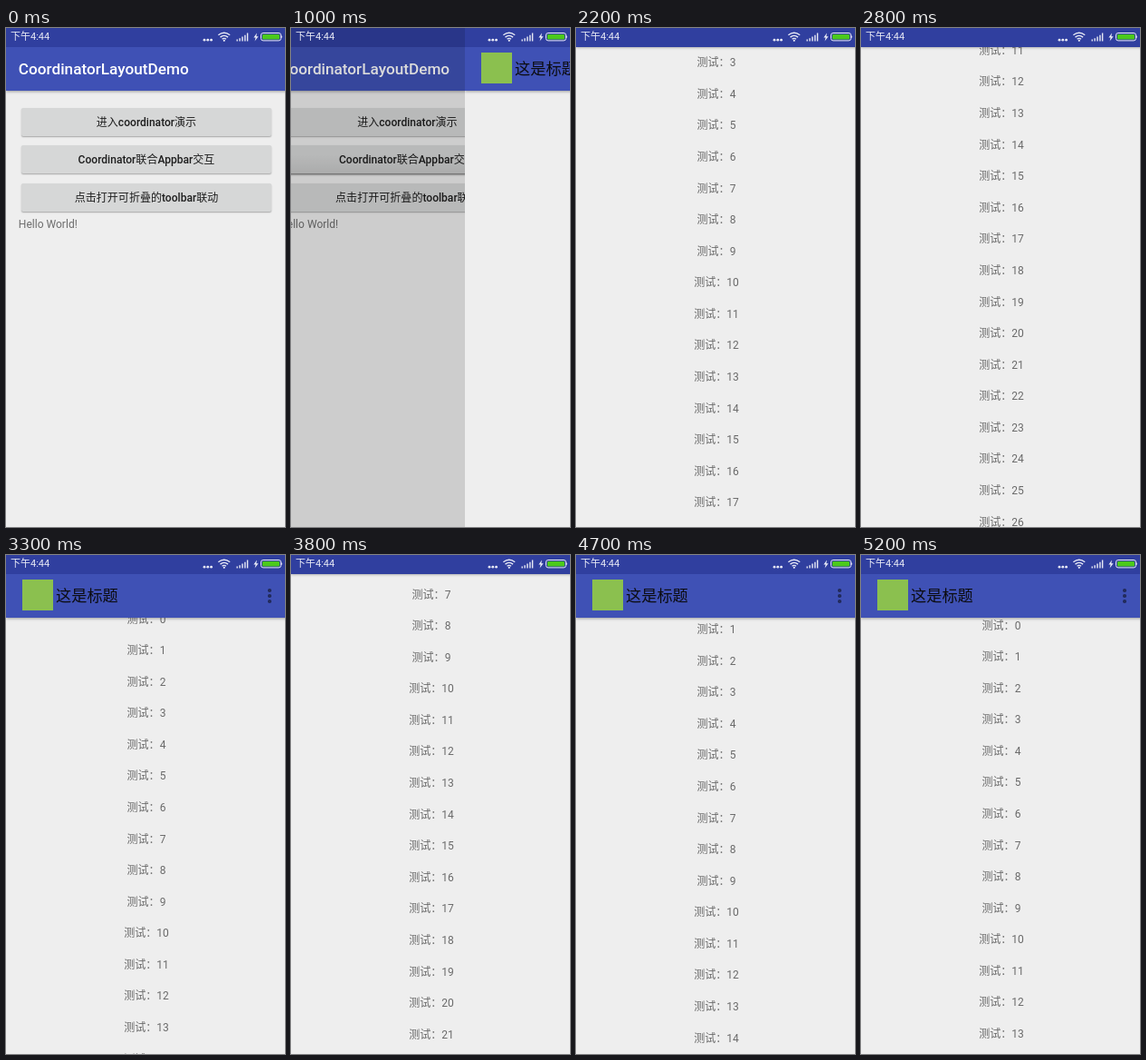
An HTML page that plays this animation: 308 px wide and 549 px high, repeating every 6 s.

```html
<!DOCTYPE html>
<html lang="zh-CN">
<head>
<meta charset="utf-8">
<title>Scrolling toolbar</title>
<style>
  html, body { margin: 0; width: 100%; height: 100%; overflow: hidden; }
  #stage {
    position: relative; width: 308px; height: 549px; overflow: hidden; background: #eee;
    font: 12.05px/20px Roboto, "Noto Sans CJK SC", "Noto Sans CJK", sans-serif; white-space: nowrap;
  }
  #stage div, #stage svg { position: absolute; }
  .page { left: 0; top: 0; width: 310px; height: 549px; overflow: hidden; background: #eee; }
  .status { left: 0; top: 0; width: 100%; height: 20.7px; background: #303f9f; }
  .bar {
    left: 0; top: 20.7px; width: 100%; height: 48.2px; background: #3f51b5;
    box-shadow: 0 1px 3px rgba(0, 0, 0, .35);
  }
  .title { top: 0; font-size: 17.2px; font-weight: 500; line-height: 49px; }
  .button {
    left: 17.2px; width: 275.6px; height: 31px; border-radius: 2px; background: #d6d7d7;
    box-shadow: 0 1px 1.5px rgba(0, 0, 0, .3);
    color: #1e1e1e; font-weight: 500; line-height: 32px; text-align: center;
  }
  .ripple {
    inset: 0; border-radius: 2px; opacity: 0;
    background: linear-gradient(transparent 33%, rgba(0, 0, 0, .07));
    box-shadow: 0 2px 2px rgba(0, 0, 0, .25);
  }
  .hello { left: 13.8px; top: 206px; color: #6d6d6d; }
  .dim { inset: 0; background: #000; opacity: 0; }
  .rows { left: 0; top: 0; width: 100%; }
  .row { width: 100%; text-align: center; color: #6a6a6a; }
  .icon { left: 17.5px; top: 6.5px; width: 34px; height: 34px; background: #8bc04f; }
  .more { left: 289.2px; width: 3.6px; height: 3.6px; border-radius: 50%; background: #222b5c; }
  .glow {
    left: 0; top: 69px; width: 100%; height: 41px; border-radius: 0 0 50% 50%;
    background: rgba(63, 81, 181, .12); opacity: 0;
  }
  .clock { left: 5px; top: 0; color: #e9ebf6; font-size: 11px; }
</style>
</head>
<body>
<div id="stage">
  <div class="page" id="home">
    <div class="bar"><div class="title" style="left:13.8px;color:#fff">CoordinatorLayoutDemo</div></div>
    <div class="status"></div>
    <div class="button" style="top:87.8px">进入coordinator演示</div>
    <div class="button" style="top:129.1px">Coordinator联合Appbar交互<div class="ripple" id="ripple"></div></div>
    <div class="button" style="top:170.5px">点击打开可折叠的toolbar联动</div>
    <div class="hello">Hello World!</div>
    <div class="dim" id="dim"></div>
  </div>
  <div class="page" id="detail">
    <div class="rows" id="rows"></div>
    <div class="glow" id="glow"></div>
    <div class="bar" id="bar">
      <div class="icon"></div>
      <div class="title" style="left:55px;color:#0c0c10">这是标题</div>
      <div class="more" style="top:16.5px"></div>
      <div class="more" style="top:22.4px"></div>
      <div class="more" style="top:28.3px"></div>
    </div>
    <div class="status"></div>
  </div>
  <div class="clock">下午4:44</div>
  <svg width="308" height="21" style="left:0;top:0" fill="#e9ebf6">
    <circle cx="219" cy="13.2" r="1.4"/><circle cx="222.8" cy="13.2" r="1.4"/><circle cx="226.6" cy="13.2" r="1.4"/>
    <g fill="none" stroke="#e9ebf6" stroke-width="1.4">
      <path d="M234.4 7.8q6.4-5 12.8 0M236.5 10.1q4.3-3.4 8.6 0M238.6 12.3q2.2-1.8 4.4 0"/>
      <path d="M255.2 14.5v-2M258.1 14.5v-3.2M261 14.5v-5M263.9 14.5v-6.8M266.6 14.5v-9"/>
    </g>
    <circle cx="240.8" cy="13.8" r="1.1"/>
    <path d="M277 5.5l-3.6 5h2.2l-1 4 4-5.2h-2.3z"/>
    <rect x="281.5" y="5.5" width="22" height="8.4" rx="2.4" fill="#303f9f" stroke="#e9ebf6"/>
    <rect x="283" y="7" width="19" height="5.4" rx="1.2" fill="#4bc91c"/>
    <path d="M304.4 8q1.6 1.7 0 3.4z"/>
  </svg>
</div>
<script>
  const LOOP = 6000, STEP = 100, WIDTH = 310, BAR = 48.2, PITCH = 34.58;
  const el = id => document.getElementById(id);
  const [home, detail, ripple, dim, rows, bar, glow] =
    ['home', 'detail', 'ripple', 'dim', 'rows', 'bar', 'glow'].map(el);

  for (let i = 0; i < 30; i++) {
    const row = document.createElement('div');
    row.className = 'row';
    row.style.top = 67.5 + i * PITCH + 'px';
    row.textContent = '测试：' + i;
    rows.append(row);
  }

  const clamp = x => Math.min(1, Math.max(0, x));
  const easeOut = (t, start, length, power) => 1 - (1 - clamp((t - start) / length)) ** power;

  // Each fling: start, length, from, to, deceleration
  const flings = [
    [2100, 700, 0, 433, 2.61],
    [2800, 600, 433, 0, 2.34],
    [3500, 800, 0, 390.8, 2.6],
    [4300, 600, 390.8, 0, 2.34]
  ];

  function scrollAt(t) {
    const fling = flings.filter(f => t >= f[0]).pop();
    if (!fling) return [0, 0];
    const [start, length, from, to, power] = fling;
    const y = from + (to - from) * easeOut(t, start, length, power);
    // The bar follows the first pixels of travel in either direction
    const hidden = to > from ? Math.min(BAR, y) : Math.max(0, BAR - (from - y));
    return [y, hidden];
  }

  const fade = (t, start, length) => t < start ? 0 : clamp(1 - (t - start) / length);

  function draw(t) {
    const slide = easeOut(t, 800, 700, 1.42);
    home.style.transform = `translateX(${-70 * slide}px)`;
    dim.style.opacity = .37 * slide;
    detail.style.transform = `translateX(${Math.round(WIDTH * (1 - slide))}px)`;
    ripple.style.opacity = clamp((t - 400) / 300);

    const [y, hidden] = scrollAt(t);
    rows.style.transform = `translateY(${-y}px)`;
    bar.style.transform = `translateY(${-hidden}px)`;
    glow.style.opacity = Math.max(fade(t, 3400, 200), fade(t, 4900, 300));
  }

  const origin = performance.now();
  function tick() {
    const t = (performance.now() - origin) % LOOP;
    draw(Math.floor(t / STEP) * STEP);
    requestAnimationFrame(tick);
  }
  tick();
</script>
</body>
</html>
```
